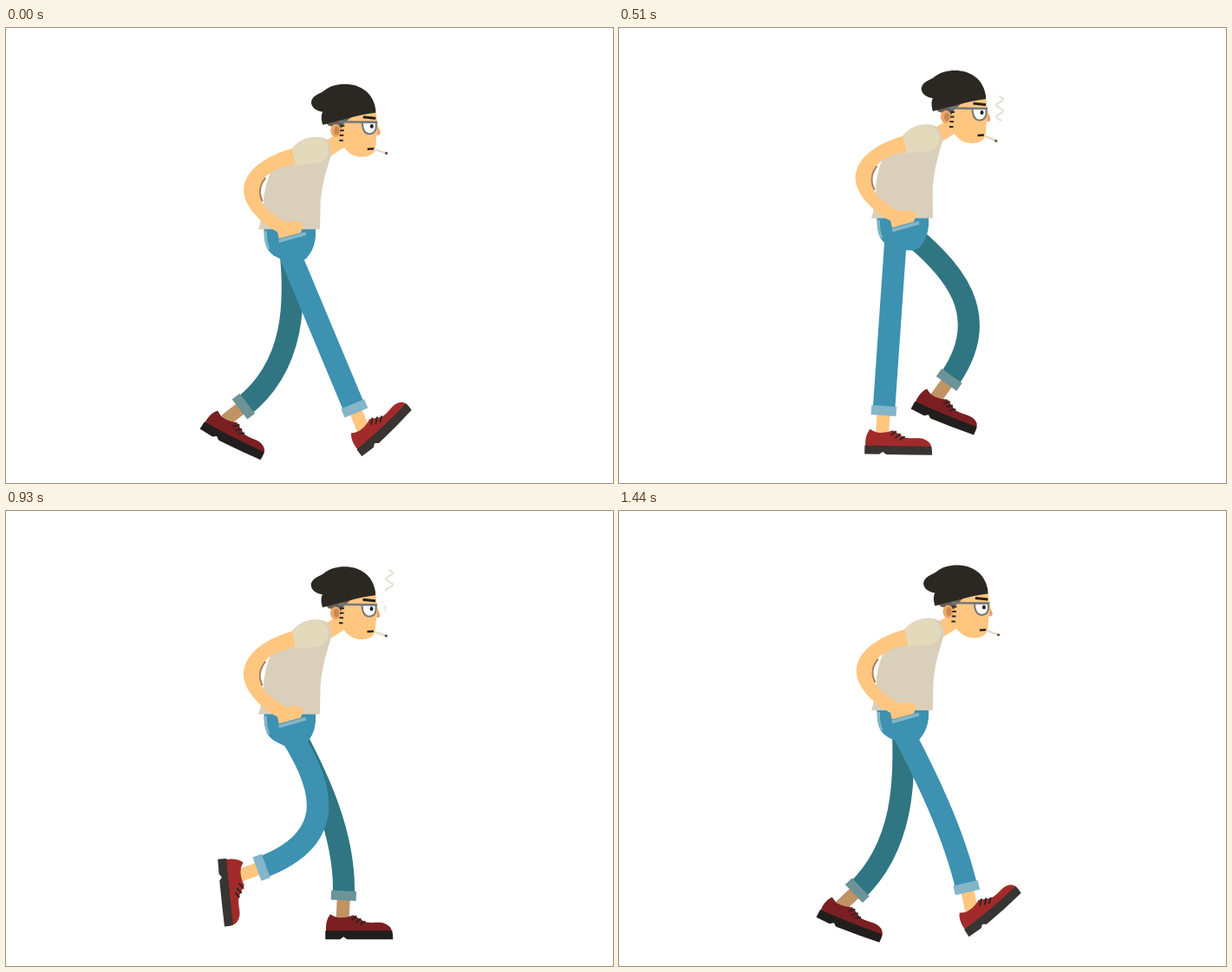
An HTML page that plays this animation: 700x525 px, repeating every 1470 ms.

```html
<!DOCTYPE html>
<html lang="en">
<head>
<meta charset="utf-8">
<title>Walk cycle</title>
<style>
html, body { margin: 0; width: 100%; height: 100%; overflow: hidden; background: #fff; }
svg { display: block; width: 100vw; height: 100vh; }
path, line { fill: none; }
</style>
</head>
<body>
<svg viewBox="0 0 700 525">
  <g id="far">
    <line stroke="#c09264" stroke-width="15"/>
    <g>
      <path style="fill:#7b1f22"/>
      <path style="fill:#211e1d"/>
      <path stroke="#2b2523" stroke-width="2"/>
    </g>
    <path stroke="#2f7682" stroke-width="25"/>
    <line stroke="#6c9398" stroke-width="29"/>
  </g>

  <g id="hips">
    <path style="fill:#3c92b0" d="M297.500 227H357C358 242 355 253 346 263L340 266H322L312 261C302 256 297 248 297.500 227Z"/>
    <path stroke="#84b5c9" stroke-width="3" d="M299.500 231Q299 243 303 252"/>
  </g>

  <g id="near">
    <line stroke="#ffc680" stroke-width="15"/>
    <g>
      <path style="fill:#a12b2a"/>
      <path style="fill:#383431"/>
      <path stroke="#2b2523" stroke-width="2"/>
    </g>
    <path stroke="#3c92b0" stroke-width="25.500"/>
    <line stroke="#84b5c9" stroke-width="29"/>
  </g>

  <g id="head">
    <path style="fill:#ffc680" d="M362 125L384 112L394 126L372 140Z"/>
    <path style="fill:#ffc680" d="M380 98L424 87L426 102L429 112Q430 116 425 116L424 128C424 138 416 141 408 141C398 141 390 135 386 127L380 116Z"/>
    <path style="fill:#ee9a78" d="M427 107L429 112Q430 116 426 116Q425 111 427 107Z"/>
    <path style="fill:#675e57" d="M363 98L398 93L386 104L385 108L370 105Z"/>
    <ellipse cx="378" cy="110.500" rx="6" ry="7.500" fill="#eda765"/>
    <ellipse cx="379" cy="110.500" rx="3" ry="5" fill="#c78850"/>
    <path stroke="#2b2823" stroke-width="2" d="M383 105H388M383 110.500H387.500M382.500 116H387M382 122H386.500"/>
    <path style="fill:#fff" stroke="#74797c" stroke-width="2" d="M408.500 101H424.500V108Q423 114.500 416.500 114.500Q409 114 408.500 101Z"/>
    <path stroke="#74797c" stroke-width="2.500" d="M382 100.500L426 101"/>
    <ellipse cx="419.500" cy="105.500" rx="2" ry="2.500" fill="#23262a"/>
    <path stroke="#24211d" stroke-width="3" d="M409.500 95L424 96.500"/>
    <path stroke="#2b2220" stroke-width="2.500" d="M414.500 132L422 131.500"/>
    <g id="cig">
      <path stroke="#e6dccb" stroke-width="2.500" d="M422 132L435 138"/>
      <path stroke="#5d4036" stroke-width="2.500" d="M434.500 137.700L437 139"/>
    </g>
    <path style="fill:#2b2823" d="M363 104C361 98 361 92 363 89C353 88 347 80 351 74C354 69 360 68 364 65C371 59 380 57 388 57C407 57 421 67 424 86V90C405 92 383 99 363 104Z"/>
    <g stroke="#e9dfd6" stroke-width="2" stroke-linecap="round">
      <path id="smoke"/>
      <path id="puff" opacity=".7"/>
    </g>
  </g>

  <g id="torso">
    <path style="fill:#dacfba" d="M328 133C340 118 360 117 370 124L374 137C371 152 363 170 362 200V229H291L293 222C297 198 295 172 310 150Z"/>
    <path style="fill:#fff" d="M301 164Q286 175 290 188L297 199Q294 181 301 164Z"/>
    <path stroke="#a9835f" stroke-width="2.500" d="M298 168Q287 182 295 196"/>
    <path stroke="#84b5c9" stroke-width="4" d="M315 243L346 234"/>
    <path style="fill:#ffc680" d="M329 133C300 141 273 158 273 183C274 203 295 222 313 232L315 240L340 233L343 224L339 220H321C308 212 291 200 291 185C291 169 303 157 334 151Z"/>
    <path style="fill:#e2dabb" d="M328 133C338 122 352 119 362 122C372 127 373 143 363 149C355 153 344 151 333 154Z"/>
  </g>
</svg>

<script>
const LOOP = 1470, STEP = LOOP / 2, TICK = 30;
const LEG = 216, WAIST = 229;
const $ = id => document.getElementById(id);

// Cuff position and shoe angle at the main poses of a stride
const POSES = [
  { t: 0, x: 404, y: 444, turn: -43 },    // heel strike
  { t: 175, x: 386, y: 449, turn: 0 },    // flat
  { t: 300, x: 357, y: 450, turn: 0 },    // mid stance
  { t: 510, x: 305, y: 447, turn: 1 },    // heel lifts
  { t: 735, x: 263, y: 440, turn: 27 },   // push off
  { t: 810, x: 266, y: 423, turn: 59 },   // kick back
  { t: 1050, x: 323, y: 409, turn: 96 },  // passing
  { t: 1290, x: 380, y: 411, turn: 4 },   // reach
  { t: 1440, x: 402, y: 440, turn: -40 }  // drop
];

const SHOE = [
  "M-19 17C-20 9 -18 1 -14 -3Q-9 1 -2 1Q6 1 12 -2L26 6C36 8 43 5 49 8Q56 11 57 17Q19 17 -19 17Z",
  "M-20 16Q18 16 57 16Q58 20 58 26Q32 26 5 26L1 23L-3 26L-20 26Z",
  "M10 4L16 -1M15 7L21 2M20 9L26 5"
];

const mod = (a, n) => ((a % n) + n) % n;
const swell = u => (1 - Math.cos(Math.PI * u)) / 2;

// Monotone cubic interpolation through the cyclic poses
function pose(time) {
  const t = mod(time, LOOP), n = POSES.length;
  const i = POSES.findLastIndex(p => p.t <= t);
  const at = k => ({ ...POSES[mod(k, n)], t: POSES[mod(k, n)].t + Math.floor(k / n) * LOOP });
  const [a, b, c, d] = [at(i - 1), at(i), at(i + 1), at(i + 2)];
  const h = c.t - b.t, u = (t - b.t) / h;
  const tangent = (m, k) => m * k > 0 ? 2 * m * k / (m + k) * h : 0;
  const value = key => {
    const slope = (p, q) => (q[key] - p[key]) / (q.t - p.t);
    const mid = slope(b, c);
    return b[key] + (c[key] - b[key]) * u * u * (3 - 2 * u)
      + tangent(slope(a, b), mid) * u * (1 - u) ** 2
      - tangent(mid, slope(c, d)) * u * u * (1 - u);
  };
  return { x: value("x"), y: value("y"), turn: value("turn") };
}

// Body height, 0 at the top and 1 at the bottom: quick drop, slower rise
function dip(t) {
  const top = 532, drop = 303;
  const s = mod(t - top, STEP);
  return s < drop ? swell(s / drop) : 1 - swell((s - drop) / (STEP - drop));
}

function setLine(el, x1, y1, x2, y2) {
  Object.entries({ x1, y1, x2, y2 }).forEach(([k, v]) => el.setAttribute(k, v));
}

// The toe curls up as the foot rolls
function drawShoe(el, x, y, turn) {
  const curl = 10 * Math.abs(Math.sin(turn * Math.PI / 90));
  SHOE.forEach((d, i) => el.children[i].setAttribute("d",
    d.replace(/(-?\d+) (-?\d+)/g, (_, px, py) => `${px} ${py - curl * ((+px + 20) / 78) ** 2}`)));
  el.setAttribute("transform", `translate(${x} ${y}) rotate(${turn + curl * 0.73})`);
}

// The leg keeps its length, so a short reach bows the knee forward
function drawLeg(id, t, dx, hipY) {
  const [ankle, shoe, trouser, cuff] = $(id).children;
  const hipX = 320, { x, y, turn } = pose(t);
  const cx = x - hipX, cy = y - hipY, d = Math.hypot(cx, cy);
  const bow = 0.42 * Math.sqrt(Math.max(0, LEG ** 2 - d ** 2));
  const knee = (along, out) => [
    hipX + cx * along + cy / d * bow * out,
    hipY + cy * along - cx / d * bow * out
  ];
  const k1 = knee(0.33, 1), k2 = knee(0.68, 1.65);
  const len = Math.hypot(x - k2[0], y - k2[1]);
  const ux = (x - k2[0]) / len, uy = (y - k2[1]) / len;
  $(id).setAttribute("transform", `translate(${dx})`);
  trouser.setAttribute("d", `M${hipX} ${hipY}C${k1} ${k2} ${x - ux * 4} ${y - uy * 4}`);
  setLine(cuff, x - ux * 11, y - uy * 11, x, y);
  setLine(ankle, x - ux * 5, y - uy * 5, x + ux * 21, y + uy * 21);
  drawShoe(shoe, x + ux * 19, y + uy * 19, turn);
}

function wave(top, bottom) {
  let d = "";
  for (let y = top; y <= bottom; y++) {
    const x = 440 + 4 * Math.sin((y - top) * 2 * Math.PI / 13.5);
    d += (d ? "L" : "M") + x.toFixed(2) + " " + y.toFixed(2);
  }
  return d;
}

// Smoke leaves the tip fast, slows down and thins out
function drawSmoke(t) {
  const u = (t - 210) / 1140;
  const top = 134 - 92 * Math.sqrt(Math.max(0, u));
  const bottom = Math.min(136, top + 29 * (1 - u ** 4));
  $("smoke").setAttribute("d", u > 0 && u < 1 ? wave(top, bottom) : "");
  const y = 112 - (t - 810) * 0.08;
  $("puff").setAttribute("d", t > 720 && t < 1170 ? `M436 ${y}q-2.500 3 0 6` : "");
}

function draw(t) {
  const waist = 17 * dip(t) - 9.5;
  const upper = dip(t + 25), shoulder = 17 * upper - 8.5, head = 18.5 * upper - 8;
  const lean = 4.5 * upper ** 2 - 1;
  const stretch = 1 - (shoulder - waist) / 110, skew = -lean / 110;
  drawLeg("far", t + STEP, 6.5, WAIST + waist + 11);
  drawLeg("near", t, 0, WAIST + waist + 11);
  $("hips").setAttribute("transform", `translate(0 ${waist})`);
  $("torso").setAttribute("transform",
    `matrix(1 0 ${skew} ${stretch} ${-WAIST * skew} ${WAIST * (1 - stretch) + waist})`);
  $("head").setAttribute("transform", `translate(${lean} ${head})`);
  $("cig").setAttribute("transform", `rotate(${-3 * Math.max(0, lean)} 422 132)`);
  drawSmoke(t);
}

const start = performance.now();
function frame() {
  const t = Math.max(0, performance.now() - start) % LOOP;
  draw(Math.floor(t / TICK) * TICK);
  requestAnimationFrame(frame);
}
frame();
</script>
</body>
</html>
```
